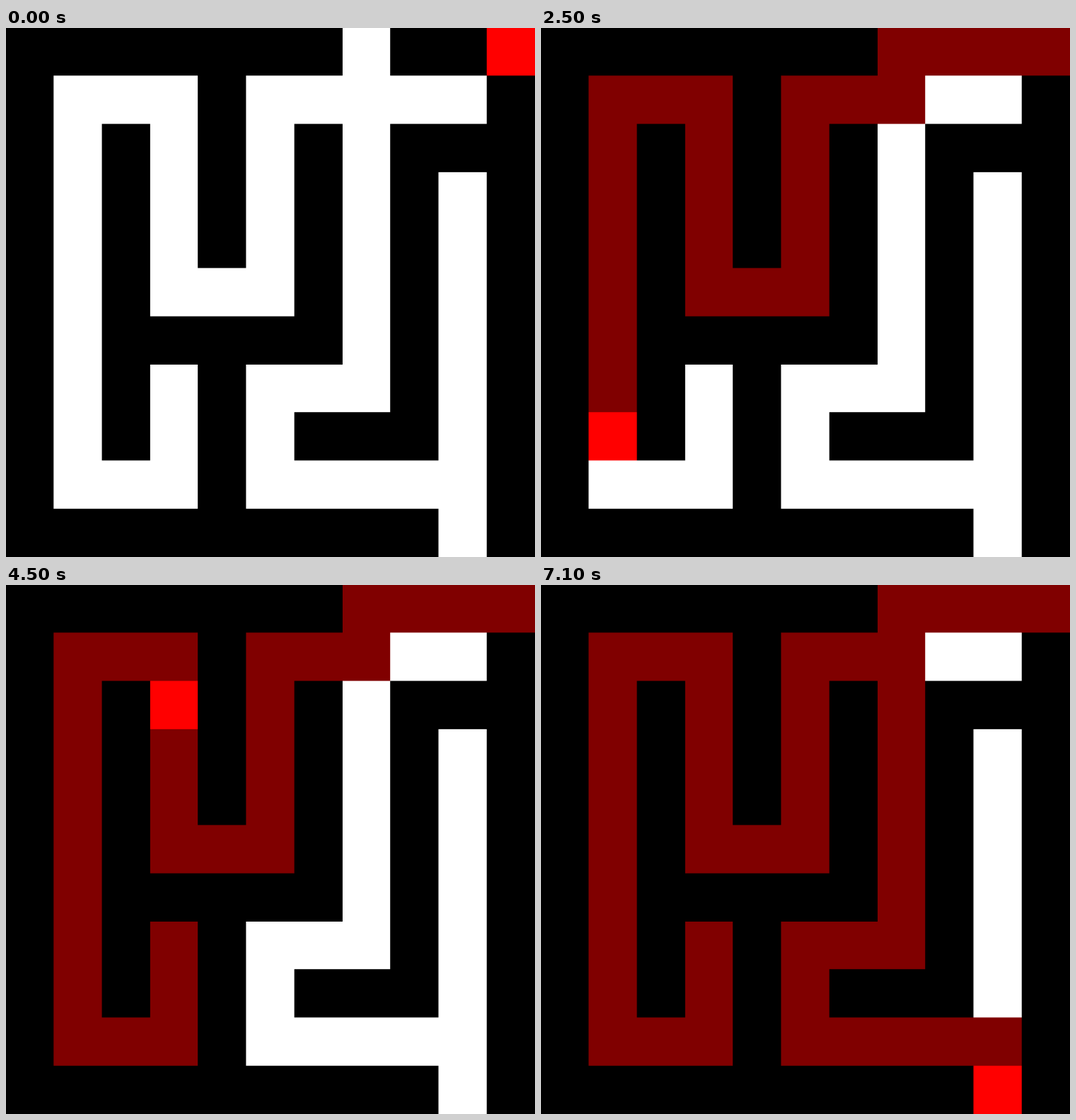
Recreate the animation shown at these times as an HTML page with a canvas. Size 748 px wide and 748 px high, loop 7200 ms.

```html
<!DOCTYPE html>
<html lang="en">
<head>
<meta charset="utf-8">
<title>Maze walk</title>
<style>
  html, body { margin: 0; width: 100%; height: 100%; overflow: hidden; background: #000; }
  canvas { display: block; width: 748px; height: 748px; }
</style>
</head>
<body>
<canvas id="view" width="748" height="748"></canvas>
<script>
const STEP = 100, SIZE = 800;

const maze = [
  '#######.###',
  '#...#.....#',
  '#.#.#.#.###',
  '#.#.#.#.#.#',
  '#.#.#.#.#.#',
  '#.#...#.#.#',
  '#.#####.#.#',
  '#.#.#...#.#',
  '#.#.#.###.#',
  '#...#.....#',
  '#########.#'
];

// The walk enters at the top right; each letter is one leg, with its length in cells.
const route = 'L3 D1 L2 D4 L2 U4 L2 D8 R2 U2 D2 L2 U8 R2 D4 R2 U4 R2 D6 L2 D2 R4 D1';
const moves = { L: [-1, 0], R: [1, 0], U: [0, -1], D: [0, 1] };

function walk(x, y) {
  const cells = [[x, y]];
  for (const [dir, count] of route.split(' ')) {
    const [dx, dy] = moves[dir];
    for (let i = 0; i < +count; i++) cells.push([x += dx, y += dy]);
  }
  return cells;
}

const path = walk(10, 0);

// The board is drawn on whole pixels, then scaled smoothly to the stage.
const board = document.createElement('canvas');
board.width = board.height = SIZE;
const pen = board.getContext('2d');
const view = document.getElementById('view').getContext('2d');
view.imageSmoothingQuality = 'high';

const line = i => Math.floor(i * SIZE / maze.length);

function fill(x, y, color) {
  pen.fillStyle = color;
  pen.fillRect(line(x), line(y), line(x + 1) - line(x), line(y + 1) - line(y));
}

let shown = -1;
function draw(time) {
  const n = Math.floor(Math.max(0, time) / STEP) % path.length;
  if (n === shown) return;
  shown = n;
  maze.forEach((row, y) => [...row].forEach((c, x) => fill(x, y, c === '.' ? '#fff' : '#000')));
  path.slice(0, n).forEach(([x, y]) => fill(x, y, '#800000'));
  fill(...path[n], '#f00');
  view.drawImage(board, 0, 0, 748, 748);
}

const start = performance.now();
function tick() {
  draw(performance.now() - start);
  requestAnimationFrame(tick);
}
tick();
</script>
</body>
</html>
```
